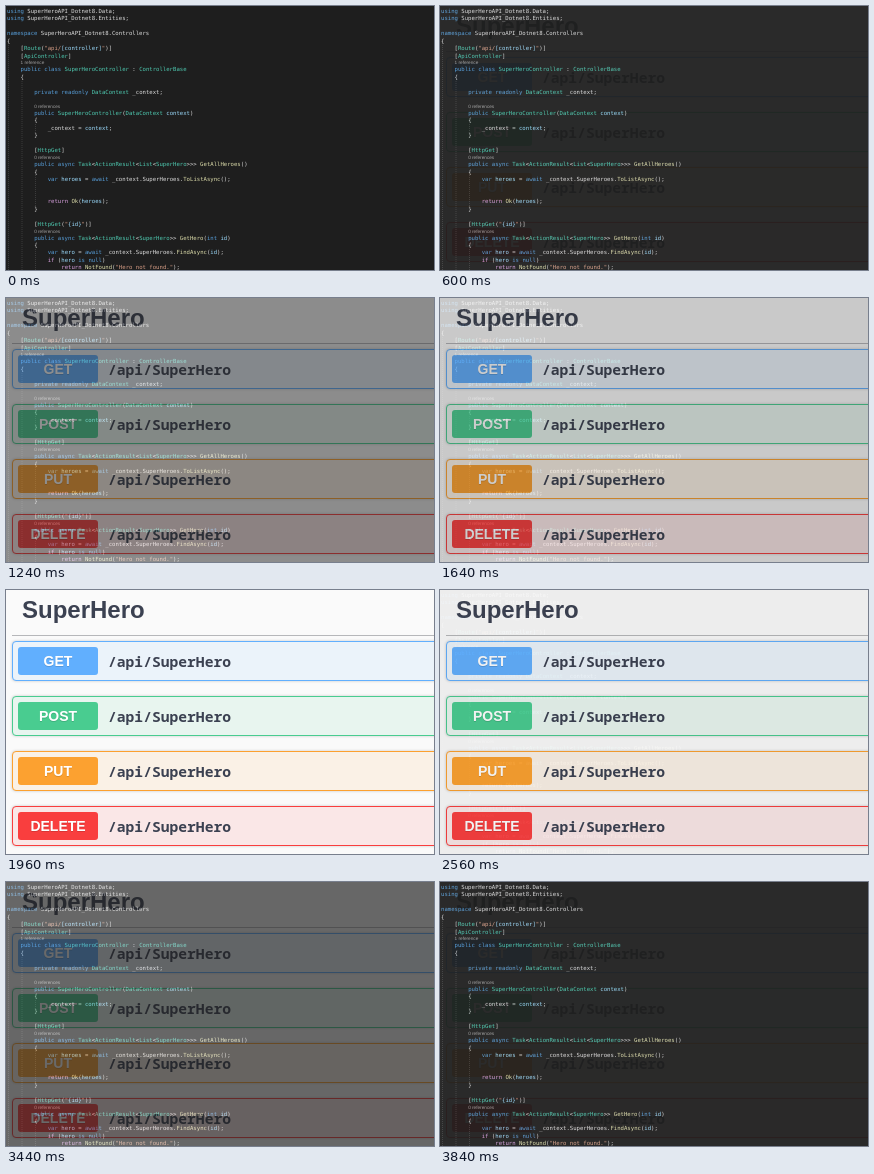
These frames come from a looping animation (428x264 px, 3.92 s). An HTML page:

```html
<!DOCTYPE html>
<html lang="en">
<head>
<meta charset="utf-8">
<style>
  html, body { margin: 0; width: 100%; height: 100%; overflow: hidden; background: #1e1e1e; }
  #stage { position: relative; width: 428px; height: 264px; overflow: hidden; }
  svg { position: absolute; inset: 0; }
  svg text { white-space: pre; text-rendering: geometricPrecision; fill: #dcdcdc; font: 5.64px "DejaVu Sans Mono", monospace; }
  svg .ref { fill: #a0a0a0; font: 4.7px "Liberation Sans", sans-serif; }
  .key { fill: #569cd6; }
  .flow { fill: #d8a0df; }
  .type { fill: #4ec9b0; }
  .call { fill: #dcdcaa; }
  .name { fill: #9cdcfe; }
  .str { fill: #d69d85; }
  .guide { stroke: #505050; stroke-width: .6; stroke-dasharray: 1 1; }

  #docs { position: absolute; inset: 0; background: #fafafa; color: #3b4151; opacity: 0; animation: fade 3.92s infinite; }
  @keyframes fade {
    0% { opacity: 0; animation-timing-function: step-end; }
    15.306% { opacity: 0; animation-timing-function: steps(18, jump-start); }
    52.04% { opacity: 1; animation-timing-function: step-end; }
    65.306% { opacity: 1; animation-timing-function: steps(17, jump-start); }
    100% { opacity: .05556; }
  }
  h1 { position: absolute; left: 16px; top: 6px; margin: 0; font: bold 24px/28px "Liberation Sans", Arial, sans-serif; }
  hr { position: absolute; left: 6px; right: 0; top: 45px; height: 1px; margin: 0; border: 0; background: #b6b7ba; }
  .row { position: absolute; left: 6px; width: 440px; height: 40px; box-sizing: border-box;
    border: 1px solid var(--c); border-radius: 4px; box-shadow: 0 0 3px #0003;
    background: color-mix(in srgb, var(--c) 10%, #fafafa); }
  .row b { position: absolute; left: 5px; top: 5px; width: 80px; height: 28px; border-radius: 3px; background: var(--c);
    color: #fff; font: bold 14px/28px "Liberation Sans", Arial, sans-serif; text-align: center; text-shadow: 0 1px 0 #0002; }
  .row span { position: absolute; left: 95px; top: 9px; font: bold 14.65px/20px "Noto Sans Mono", monospace; }
</style>
</head>
<body>
<div id="stage">
  <svg id="code" width="428" height="264"></svg>
  <div id="docs"><h1>SuperHero</h1><hr></div>
</div>
<script>
const source = `using SuperHeroAPI_Dotnet8.Data;
using SuperHeroAPI_Dotnet8.Entities;

namespace SuperHeroAPI_Dotnet8.Controllers
{
    [Route("api/[controller]")]
    [ApiController]
    1 reference
    public class SuperHeroController : ControllerBase
    {

        private readonly DataContext _context;

        0 references
        public SuperHeroController(DataContext context)
        {
            _context = context;
        }

        [HttpGet]
        0 references
        public async Task<ActionResult<List<SuperHero>>> GetAllHeroes()
        {
            var heroes = await _context.SuperHeroes.ToListAsync();


            return Ok(heroes);
        }

        [HttpGet("{id}")]
        0 references
        public async Task<ActionResult<SuperHero>> GetHero(int id)
        {
            var hero = await _context.SuperHeroes.FindAsync(id);
            if (hero is null)
                return NotFound("Hero not found.");`;

const kinds = {
  key: 'using namespace public class private readonly async await var is null int',
  flow: 'return if',
  type: 'Route ApiController SuperHeroController ControllerBase DataContext Task ActionResult List HttpGet SuperHero',
  call: 'GetAllHeroes GetHero Ok ToListAsync FindAsync NotFound',
  name: 'heroes hero id context'
};
const kindOf = {};
for (const kind in kinds) for (const word of kinds[kind].split(' ')) kindOf[word] = kind;

const escape = s => s.replace(/</g, '&lt;').replace(/>/g, '&gt;');
const span = (kind, s) => `<tspan class="${kind}">${s}</tspan>`;
const paint = line => line.replace(/"[^"]*"|\w+|[^\w"]+/g, t => {
  if (t[0] === '"') return span('str', t.replace(/[[{]\w+[\]}]/, m => span('name', m)));
  return kindOf[t] ? span(kindOf[t], t) : escape(t);
});

const charW = 3.392, left = 1;
const guide = (x, y1, y2) => `<line class="guide" x1="${x}" x2="${x}" y1="${y1}" y2="${y2}"/>`;
let svg = guide(2.5, 39, 264) + guide(16, 75, 264) +
  guide(29.5, 118, 126) + guide(29.5, 169, 200) + guide(29.5, 243, 264);
let y = -.65;
for (const line of source.split('\n')) {
  const text = line.trim(), isRef = /^\d ref/.test(text);
  y += isRef ? 6.4 : 7.45;
  if (!text) continue;
  const x = left + charW * line.search(/\S/);
  svg += isRef
    ? `<text class="ref" x="${x}" y="${y + .5}">${text}</text>`
    : `<text x="${x}" y="${y}">${paint(text)}</text>`;
}
document.getElementById('code').innerHTML = svg;

const verbs = [['GET', '#61affe'], ['POST', '#49cc90'], ['PUT', '#fca130'], ['DELETE', '#f93e3e']];
document.getElementById('docs').innerHTML += verbs.map(([verb, color], i) =>
  `<div class="row" style="--c:${color};top:${51 + 55 * i}px"><b>${verb}</b><span>/api/SuperHero</span></div>`).join('');
</script>
</body>
</html>
```
